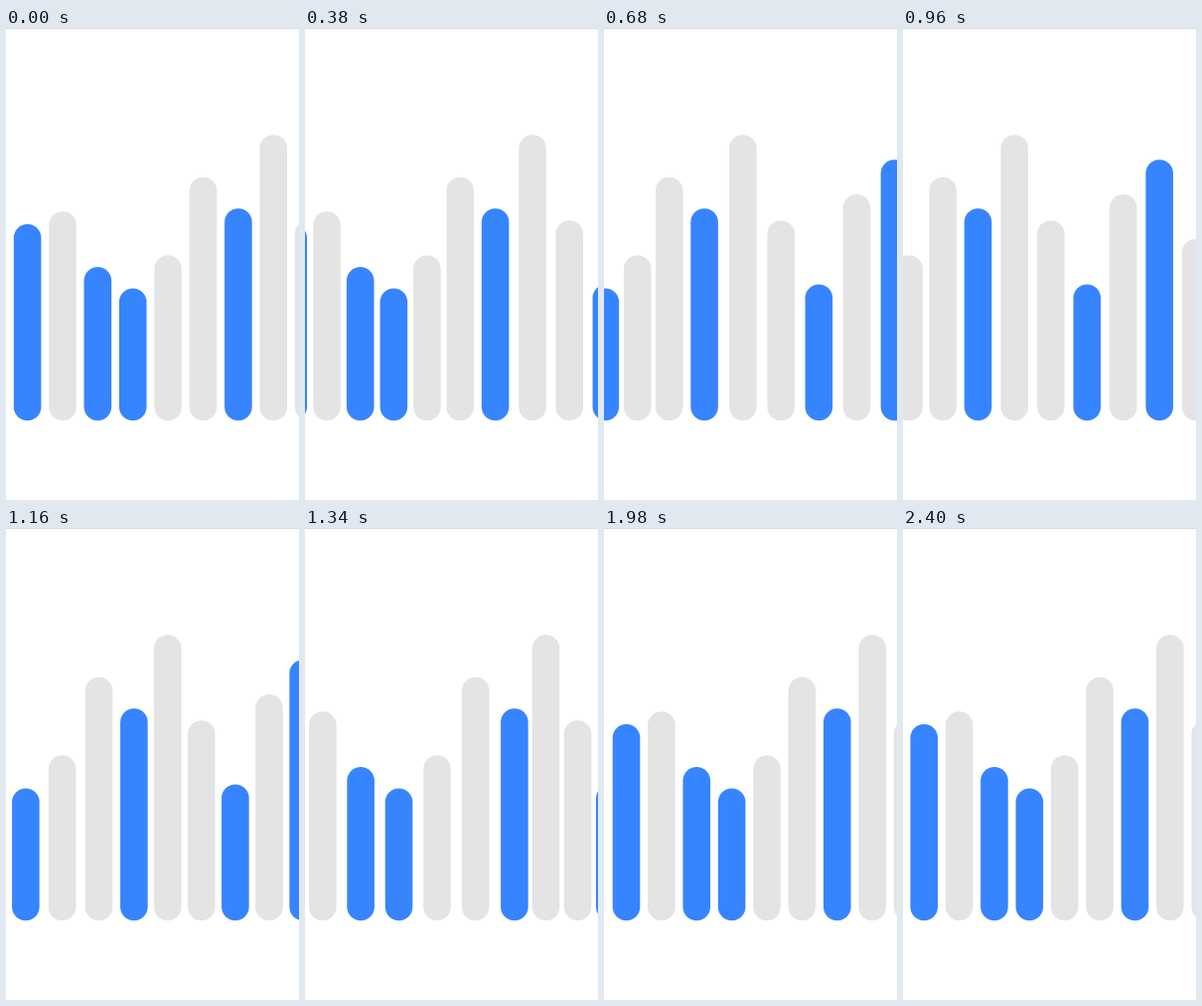
Write an HTML page that moves like this. It is 295 by 474 pixels and loops after 2.44 s.

```html
<!DOCTYPE html>
<html lang="en">
<head>
<meta charset="utf-8">
<title>Elastic bars</title>
<style>
  html, body { margin: 0; width: 100%; height: 100%; overflow: hidden; background: #fff; }
  svg { display: block; width: 295px; height: 474px; }
</style>
</head>
<body>
<svg id="stage" viewBox="0 0 295 474">
  <rect width="295" height="1" fill="#dcdcdc"/>
</svg>
<script>
const LOOP = 2440, STEP = 20;
const LEFT = 7.8, PITCH = 35.38, WIDTH = 27.6, BOTTOM = 394.3;
const BLUE = '#3784ff', GRAY = '#e4e4e4';

const tops = [197, 184.2, 240, 261.5, 228.3, 149.8, 181.2, 107.2, 193.2, 257.5, 167, 132.3, 212];
const blueBars = new Set([0, 2, 3, 6, 9, 11]);

// [time in ms, value]
const scroll = [[225, 0], [380, -42.3], [680, -132.8], [860, -168], [1160, -105], [1340, -23],
  [1520, 32], [1600, 25], [1680, 15.4], [1760, 8.5], [1860, 3.6], [2000, 0.7], [2380, -0.4]];
// How far each bar trails its neighbour nearer the finger
const stretch = [[225, 0], [380, 2.1], [680, 3.4], [740, 3.5], [860, 2.7], [1160, -1.55],
  [1340, -3.8], [1520, -2.6], [1680, -0.45], [1860, 0]];
// Left end of the group held by the finger
const grip = [[1160, 5], [1340, 6]];

// Smooth curve through the points, flat at ends and turning points
function curve(points) {
  const rise = i => (points[i + 1][1] - points[i][1]) / (points[i + 1][0] - points[i][0]);
  const slopes = points.map((p, i) => {
    if (i === 0 || i === points.length - 1 || rise(i - 1) * rise(i) <= 0) return 0;
    const [a, b] = [points[i - 1], points[i + 1]];
    return (b[1] - a[1]) / (b[0] - a[0]);
  });
  return t => {
    if (t <= points[0][0]) return points[0][1];
    const next = points.findIndex(p => p[0] > t);
    if (next < 0) return points[points.length - 1][1];
    const i = next - 1, [t0, v0] = points[i], [t1, v1] = points[next];
    const span = t1 - t0, u = (t - t0) / span, w = 1 - u;
    return v0 * w * w * (1 + 2 * u) + v1 * u * u * (3 - 2 * u)
      + span * u * w * (slopes[i] * w - slopes[next] * u);
  };
}

const scrollAt = curve(scroll), stretchAt = curve(stretch), gripAt = curve(grip);
const stage = document.getElementById('stage');

const bars = tops.map((top, i) => {
  const bar = document.createElementNS('http://www.w3.org/2000/svg', 'rect');
  const attrs = { y: top, width: WIDTH, height: BOTTOM - top, rx: WIDTH / 2,
    fill: blueBars.has(i) ? BLUE : GRAY };
  for (const name in attrs) bar.setAttribute(name, attrs[name]);
  return stage.appendChild(bar);
});

function draw(t) {
  const shift = scrollAt(t), lag = stretchAt(t), held = gripAt(t);
  bars.forEach((bar, i) => {
    const distance = i >= 6 ? i - 6 : Math.max(0, held - i);
    bar.setAttribute('x', LEFT + PITCH * i + shift + lag * distance ** 0.9);
  });
}

const start = performance.now();
function tick() {
  const t = (performance.now() - start) % LOOP;
  draw(Math.floor(t / STEP) * STEP);
  requestAnimationFrame(tick);
}
tick();
</script>
</body>
</html>
```
